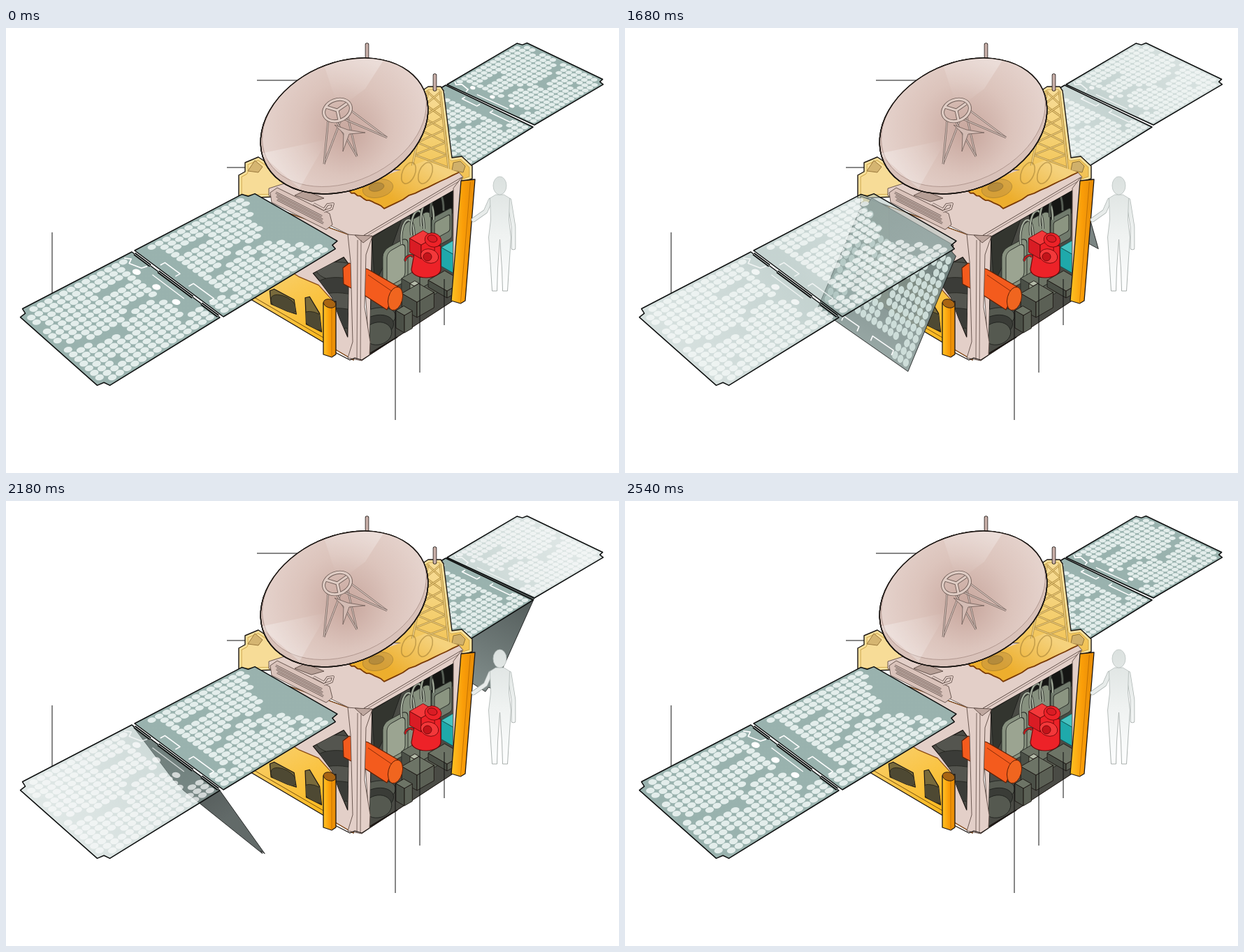
Write an HTML page with a canvas that moves like this. It is 877 px wide and 638 px high and loops after 4040 ms.

```html
<!DOCTYPE html>
<html lang="en">
<head>
<meta charset="utf-8">
<title>Orbiter unfolding its solar panels</title>
<style>
html, body { margin: 0; width: 100%; height: 100%; overflow: hidden; background: #fff; }
canvas { display: block; width: 877px; height: 638px; }
</style>
</head>
<body>
<canvas id="stage"></canvas>
<script>
const W = 877, H = 638, LOOP = 4040, STEP = 60;
const canvas = document.getElementById('stage');
const g = canvas.getContext('2d');
const dpr = window.devicePixelRatio || 1;
canvas.width = Math.round(W * dpr);
canvas.height = Math.round(H * dpr);

const INK = '#1c1714', PINK = '#e3cfc8', EDGE = '#5d4b45', FOIL = '#f7dc97';

// ---- drawing helpers ----
function path(p, open) {
  g.beginPath();
  for (let i = 0; i < p.length; i += 2) g.lineTo(p[i], p[i + 1]);
  if (!open) g.closePath();
}
function paint(fill, stroke, width = 0.9) {
  if (fill) { g.fillStyle = fill; g.fill(); }
  if (stroke) { g.strokeStyle = stroke; g.lineWidth = width; g.stroke(); }
}
function poly(p, fill, stroke, width) { path(p); paint(fill, stroke, width); }
function line(p, stroke, width) { path(p, true); paint(null, stroke, width); }
function rod(p, color, width, edge = EDGE) {
  line(p, edge, width + 1.6);
  line(p, color, width);
}
function oval(x, y, rx, ry, turn, fill, stroke, width) {
  g.beginPath();
  g.ellipse(x, y, rx, ry, turn, 0, Math.PI * 2);
  paint(fill, stroke, width);
}
function fade(x0, y0, x1, y1, ...colors) {
  const f = g.createLinearGradient(x0, y0, x1, y1);
  colors.forEach((c, i) => f.addColorStop(i / (colors.length - 1), c));
  return f;
}
function scoped(draw) { g.save(); draw(); g.restore(); }
function hash(i, j) {
  const s = Math.sin(i * 127.1 + j * 311.7) * 43758.5453;
  return s - Math.floor(s);
}

// A quad holds a0, a1, b1, b0; u runs from edge a to edge b, v from 0 to 1.
function place(q, u, v) {
  return [0, 1].map(i =>
    (q[i] * (1 - v) + q[2 + i] * v) * (1 - u) + (q[6 + i] * (1 - v) + q[4 + i] * v) * u);
}
// Polygon on an upright face: pairs of (right, down) fractions.
function patch(q, p, fill, stroke, width) {
  const out = [];
  for (let i = 0; i < p.length; i += 2) out.push(...place(q, p[i + 1], p[i]));
  poly(out, fill, stroke, width);
}
// Box seen from its front edge; x, y is the top of that edge.
function box(x, y, left, right, h, [top, side, front], edge = INK) {
  const lx = x - left * 0.87, ly = y - left * 0.5, rx = x + right * 0.87, ry = y - right * 0.5;
  poly([x, y, lx, ly, lx, ly + h, x, y + h], side, edge);
  poly([x, y, rx, ry, rx, ry + h, x, y + h], front, edge);
  poly([x, y, lx, ly, lx + rx - x, ly + ry - y, rx, ry], top, edge);
}
// Rounded plate parallel to the right-hand face.
function plate(x, y, w, h, r, fill) {
  scoped(() => {
    g.transform(1, -0.55, 0, 1, x, y);
    g.beginPath();
    g.roundRect(0, 0, w, h, r);
    paint(fill, '#2b2e29', 1);
  });
}
function arch(x, y, w, h, color) {
  for (const [c, lw] of [['#30332e', 3.8], [color, 2.2]]) {
    g.beginPath();
    g.moveTo(x, y);
    g.bezierCurveTo(x - 4, y - h, x + w, y - h - w * 0.9, x + w, y - w * 0.5);
    paint(null, c, lw);
  }
}

// ---- solar panels: hinge edge first, free edge last ----
const PANELS = {
  nearIn: [184, 319, 311, 414, 482, 310, 348, 233],
  nearOut: [180, 321, 306, 415, 138, 519, 13, 408],
  farIn: [629, 82, 754, 142, 640, 213, 520, 145],
  farOut: [631, 81, 756, 139, 861, 77, 738, 18]
};
function outline(q) {
  const notched = [[0, 0], [0, 1], [0.937, 1], [0.95, 0.95], [1, 0.94], [1, 0.06], [0.95, 0.05], [0.937, 0]];
  return notched.flatMap(([u, v]) => place(q, u, v));
}
function hasCell(u, v, inner) {
  if (u < 0.14 && v > 0.06 && v < 0.82) return false;
  if (inner && u > 0.95 - 0.2 * Math.sin(Math.PI * v)) return false;
  if (u > 0.93 && (v < 0.07 || v > 0.93)) return false;
  const wave = Math.sin(u * 9 + (inner ? 0 : 2));
  return Math.abs(v - 0.55 - 0.07 * wave) > 0.028 && !(u < 0.5 && Math.abs(v - 0.3 + 0.2 * u) < 0.025);
}
function cells(q, inner, color) {
  const nu = 15, nv = 16;
  g.fillStyle = color;
  for (let i = 0; i < nu; i++) for (let j = 0; j < nv; j++) {
    const u = 0.015 + (i + 0.5) / nu * 0.96, v = 0.02 + (j + 0.5) / nv * 0.96;
    if (!hasCell(u, v, inner) || hash(i, j) < 0.02) continue;
    const [x, y] = place(q, u, v), a = place(q, u + 0.96 / nu, v), b = place(q, u, v + 0.96 / nv);
    scoped(() => {
      g.transform(a[0] - x, a[1] - y, b[0] - x, b[1] - y, x, y);
      g.beginPath();
      g.arc(0, 0, 0.47, 0, 7);
    });
    g.fill();
  }
}
function fittings(q, inner) {
  const at = (u, v) => place(q, u, v);
  if (inner) {
    for (const [a, b] of [[0.25, 0.42], [0.57, 0.8]])
      line([at(0.03, a), at(0.07, a), at(0.07, b), at(0.03, b)].flat(), '#fff', 1.6);
    return;
  }
  line([at(0.08, 0.02), at(0.05, 0.06), at(0.09, 0.09), at(0.06, 0.19), at(0.02, 0.2)].flat(), '#fff', 1.7);
  line([at(0.05, 0.3), at(0.05, 0.66)].flat(), '#fff', 1.4);
  const size = Math.hypot(q[4] - q[2], q[5] - q[3]) / 195;
  for (let i = 0; i < 3; i++) oval(...at(0.11, 0.2 + i * 0.225), 6 * size, 4 * size, 0.2, '#fff');
}
function panel(q, inner, { alpha = 1, light = [65, 65 + (1 - alpha) * 25], sat = 14, cell, edge = 1.5 }) {
  const root = place(q, 0, 0.5), tip = place(q, 1, 0.5), shape = outline(q);
  scoped(() => {
    g.globalAlpha = alpha;
    poly(shape, fade(...root, ...tip, ...light.map(l => `hsl(170 ${sat}% ${l}%)`)));
    g.globalAlpha = 0.4 + 0.6 * alpha;
    if (cell !== 0) {
      cells(q, inner, `hsl(168 21% ${cell || 91 + (1 - alpha) * 14}%)`);
      fittings(q, inner);
    }
  });
  poly(shape, null, '#0d0f0f', edge);
}
function slots(q) {
  for (const [a, b] of [[0.03, 0.21], [0.3, 0.69], [0.79, 0.98]]) {
    const p = [...place(q, 0, a), ...place(q, 0, b)];
    line(p, '#0d0f0f', 4.5);
    line(p, '#dbe4e2', 1);
  }
}

// Swing about a hinge: angle 0 hangs down, 90 is fully open.
function swing(hinge, open, down, angle) {
  const r = angle * Math.PI / 180, c = Math.cos(r), s = Math.sin(r);
  const tip = i => hinge[i] + (open[i] - hinge[i]) * s + down[i] * c;
  return [...hinge, tip(2), tip(3), tip(0), tip(1)];
}
function hangInner(hinge, home, down, angle) {
  const q = swing(hinge, home.slice(0, 4), down, angle);
  return [...q.slice(6), ...q.slice(4, 6), ...q.slice(2, 4), ...q.slice(0, 2)];
}
function hangOuter(home, down, angle) {
  return swing(home.slice(0, 4), [...home.slice(6), ...home.slice(4, 6)], down, angle);
}
function swingFar({ first, second }) {
  if (first !== undefined)
    panel(hangInner([545, 150, 645, 202], PANELS.farIn, [-20, 155, -20, 160], first), true,
      { light: [50, 32], sat: 4, cell: 0, edge: 0.8 });
  if (second !== undefined) {
    const lift = 26 * Math.max(0, Math.sin(second * Math.PI / 180));
    panel(hangOuter(PANELS.farOut, [-5, 98, -5, 126], second), false,
      { light: [34 + lift, 52 + lift], sat: 5, cell: 0, edge: 0.8 });
  }
}
function swingNear({ first, second, solid }) {
  if (first !== undefined)
    panel(hangInner([345, 239, 478, 316], PANELS.nearIn, [5, 142, 4, 148], first), true,
      { alpha: solid, light: [60, 43], sat: 8, cell: 84, edge: 0.8 });
  if (second !== undefined)
    panel(hangOuter(PANELS.nearOut, [-32, 164, -30, 186], second), false,
      second < -25 ? { light: [30, 40], sat: 4, cell: 0, edge: 0.8 } : { light: [46, 60], sat: 8, cell: 86, edge: 0.8 });
}

// ---- spacecraft ----
function foil(p, fill) {
  scoped(() => {
    path(p);
    g.clip();
    paint(fill, '#c99f3d', 9);
    paint(null, '#f8e09c', 7.4);
  });
  poly(p, null, INK, 1.4);
}
function backWalls() {
  foil([333, 244, 333, 211, 342, 206, 342, 193, 361, 185, 376, 195, 440, 240], FOIL);
  poly([346, 205, 356, 190, 367, 199, 361, 207], '#d5b571', '#927035');
  foil([598, 88, 604, 84, 622, 84, 626, 90, 638, 186, 652, 184, 667, 198, 667, 216, 541, 258, 540, 200],
    fade(600, 90, 590, 250, FOIL, '#f4cd6b', '#f0b83d'));
  poly([638, 204, 640, 193, 650, 191, 657, 198, 654, 207], '#d0b06a', '#8c6d33');
  const left = y => 604 - (y - 90) * 0.21, right = y => 621 + (y - 90) * 0.11;
  for (let y = 92; y < 200; y += 18) {
    rod([left(y), y, right(y + 18), y + 18], '#f0d287', 1.2, '#b08c3c');
    rod([right(y), y, left(y + 18), y + 18], '#f0d287', 1.2, '#b08c3c');
  }
  for (const side of [left, right]) rod([side(90), 90, side(208), 208], '#f0d287', 1.4, '#b08c3c');
  g.lineCap = 'round';
  for (const [x, y] of [[613.5, 68], [516.5, 24]]) rod([x, y, x, y + 20], '#c9b0a9', 4, INK);
  g.lineCap = 'butt';
}

// Ragged line through key points.
function jag(p) {
  const out = [];
  for (let i = 0; i + 3 < p.length; i += 2) for (let k = 0; k < 12; k++) {
    const t = k / 12;
    out.push(p[i] + (p[i + 2] - p[i]) * t, p[i + 1] + (p[i + 3] - p[i + 1]) * t + (hash(i, k) - 0.5) * 3);
  }
  return [...out, ...p.slice(-2)];
}
function topFace() {
  poly([376, 230, 470, 200, 648, 207, 654, 214, 509, 299, 492, 297, 376, 240], PINK, EDGE);
  const torn = jag([490, 234, 541, 258, 648, 207]);
  poly([...torn, 600, 190, 520, 220], fade(600, 190, 560, 250, '#f5d27d', '#edae2d'));
  line(torn, '#7a3b08', 1.8);
  scoped(() => {
    g.globalAlpha = 0.45;
    oval(532, 230, 22, 13, -0.2, '#b58d45', '#7d6029');
    oval(530, 228, 11, 6, -0.2, '#8f7440', '#71551f');
    for (const x of [576, 600]) oval(x, 208, 9, 16, 0.4, null, '#8c6a27', 1.6);
  });
  poly([378, 236, 388, 229, 463, 266, 467, 282, 458, 289, 380, 250], '#dac3bb', EDGE);
  for (let i = 0; i < 3; i++) rod([386 + i, 236 + i * 5, 452 + i, 270 + i * 5], PINK, 1.3);
  poly([413, 240, 428, 233, 455, 244, 437, 249], '#b69f96', EDGE);
  rod([440, 252, 455, 260, 460, 253, 468, 252, 466, 259, 455, 263], PINK, 2);
}

const LEFT = [337, 241, 500, 300, 497, 476, 340, 383];
function leftFace() {
  patch(LEFT, [0, 0, 1, 0, 1, 1, 0, 1], fade(350, 290, 440, 450, FOIL, '#fbb91f'), INK, 1.4);
  line([...place(LEFT, 0.96, 0.02), ...place(LEFT, 0.96, 0.74)], '#7a5510', 1);
  patch(LEFT, [0.25, 0, 1, 0, 1, 1, 0.8, 1, 0.8, 0.6, 0.68, 0.53, 0.5, 0.54, 0.25, 0.5], PINK, '#8a4a14', 1.2);
  scoped(() => {
    patch(LEFT, [0.63, 0.45, 0.9, 0.2, 0.945, 0.24, 0.945, 0.84, 0.87, 0.72, 0.8, 0.58, 0.7, 0.5], '#4b4c46', INK, 1.2);
    g.clip();
    for (let i = 0; i < 4; i++) oval(480, 350 + i * 22, 36, 14, 0.1, i % 2 ? '#3b3c38' : '#54554f', '#252621');
  });
  const windows = [[0.24, 0.81, 0.28, 0.77, 0.46, 0.77, 0.48, 0.89, 0.4, 0.91, 0.25, 0.93],
    [0.56, 0.7, 0.6, 0.67, 0.69, 0.77, 0.71, 0.92, 0.57, 0.93]];
  windows.forEach((w, i) => scoped(() => {
    patch(LEFT, w, '#786a3c', INK, 1.2);
    g.clip();
    oval(397 + i * 46, 396 + i * 24, 20, 11, 0.5, '#4e4933', '#292417');
  }));
}

const RIGHT = [509, 299, 652, 214, 641, 390, 520, 469];
const METAL = ['#6d7466', '#4b5047', '#5b6055'];
function instruments() {
  patch(RIGHT, [0, 0, 1, 0, 1, 1, 0, 1], PINK, EDGE);
  line([...place(RIGHT, 0.02, 0.02), ...place(RIGHT, 0.02, 1)], EDGE, 0.7);
  scoped(() => {
    patch(RIGHT, [0.1, 0.05, 0.92, 0.07, 0.99, 1, 0, 1], '#4a4b45', INK, 1);
    g.clip();
    patch(RIGHT, [0.48, 0.05, 0.93, 0.05, 0.93, 0.26, 0.5, 0.26], '#151614');
    patch(RIGHT, [0.1, 0.06, 0.4, 0.05, 0.25, 0.3, 0.1, 0.45], '#33352f', '#1e1f1c');
    plate(566, 283, 42, 92, 10, '#87917f');
    plate(539, 319, 36, 62, 9, '#87917f');
    plate(545, 322, 26, 50, 7, '#9ba491');
    plate(609, 273, 29, 44, 4, '#717b6d');
    plate(613, 279, 22, 24, 3, '#8b9581');
    for (let i = 0; i < 4; i++) arch(566 + i * 14, 310 - i * 13, 18, 36, i < 3 ? '#a4ad9c' : '#5b6359');
    for (let i = 0; i < 3; i++) oval(528 + i * 2, 418 + i * 10, 30 - i * 5, 16, -0.25, i % 2 ? '#3a3c37' : '#555950', '#1f211d');
    box(592, 374, 30, 34, 20, METAL, '#282b26');
    box(584, 370, 7, 8, 10, ['#b3baa8', '#8d9684', '#9ba491']);
  });
  box(588, 393, 25, 28, 22, METAL);
  box(631, 377, 31, 27, 10, METAL);
  box(570, 412, 14, 13, 25, METAL);
}
function frame() {
  patch(RIGHT, [0.92, 0.05, 1, 0, 1, 0.9, 0.98, 0.92], PINK, EDGE);
  line([520, 467, 560, 443], INK, 2);
  poly([489, 296, 524, 299, 515, 325, 513, 400, 521, 450, 520, 469, 509, 477, 489, 473, 496, 450, 493, 335], PINK, EDGE);
  poly([499, 297, 524, 298, 511, 308], '#bea79f', EDGE);
  for (const x of [503, 508]) line([x, 304, x - 1, 475], EDGE, 0.8);
  line([467, 463, 492, 476, 499, 473, 509, 476, 520, 469], INK, 1.3);
}

function pillar(x0, y0, x1, y1, w) {
  poly([x0 - w, y0, x0 + w, y0 - 2, x1 + w, y1, x1 + w / 3, y1 + 4, x1 - w, y1],
    fade(x1 - w, y1, x0 + w, y1, '#ffc325', '#fa9d08', '#e58a06'), INK, 1.3);
  line([x0 + w / 3, y0 + 2, x1 + w / 3, y1 + 4], '#b76905', 0.8);
}

const RED = ['#f3383a', '#d91c24', '#ed2228'];
const TEAL = ['#45c2c0', '#1fa9ab', '#25b3b4'];
function cameras() {
  box(641, 325, 21, 19, 27, TEAL, '#0d5758');
  oval(650, 331, 7, 10, 0.2, '#17a1a3', '#0d5758');

  const dark = '#6f0709';
  g.beginPath();
  g.ellipse(601, 346, 21, 12, 0, 0, Math.PI);
  g.lineTo(585, 318);
  g.lineTo(622, 312);
  g.closePath();
  paint(RED[2], dark, 1.2);
  box(594, 311, 19, 22, 20, RED, dark);
  oval(611, 304, 12, 10, 0.3, RED[2], dark);
  oval(610, 302, 7, 5, 0.3, RED[1], dark);
  oval(606, 327, 13, 10, 0.3, RED[0], dark);
  oval(603, 328, 6, 6, 0, '#c4141a', dark);
  arch(572, 334, 10, 4, '#c2191d');

  poly([482, 344, 491, 337, 518, 346, 561, 371, 545, 404, 514, 384, 483, 367], '#f45b1d', '#5d1e05', 1.1);
  line([518, 354, 553, 378], '#7d2807', 0.9);
  oval(557, 388, 10, 17, 0.25, '#f0651f', '#5d1e05', 1);
}

function dish() {
  const rim = fill => oval(484, 140.5, 125, 90.7, -0.426, fill, INK, 1.4);
  rim('#d9c2ba');
  scoped(() => {
    rim();
    g.clip();
    const bowl = g.createRadialGradient(488, 150, 10, 484, 138, 125);
    bowl.addColorStop(0, '#caaaa1');
    bowl.addColorStop(0.5, '#dcc4bc');
    bowl.addColorStop(1, '#e6d4ce');
    oval(484, 134, 123, 86, -0.43, bowl, '#a68c84', 0.8);
    g.globalAlpha = 0.3;
    poly([454, 50, 544, 40, 514, 87, 490, 105, 472, 105], fade(510, 45, 485, 110, '#fff', '#fff0'));
    poly([460, 160, 420, 230, 364, 180], fade(460, 160, 390, 205, '#fff0', '#fff'));
  });
  rim();

  const metal = '#dfccc4';
  for (const [x, y] of [[455, 195], [502, 184], [545, 157]]) {
    const a = Math.atan2(y - 118, x - 474);
    for (const side of [-0.5, 0.5])
      rod([474 + 19 * Math.cos(a + side), 118 + 15 * Math.sin(a + side), x, y], metal, 1.1, '#75635d');
  }
  poly([470, 139, 489, 146, 514, 150, 491, 152, 482, 177, 483, 151], '#d4bcb4', '#75635d');
  for (const [color, lw] of [['#6f5d57', 5], [metal, 3.2]]) {
    oval(474, 118, 20, 15, -0.38, null, color, lw);
    for (let i = 0; i < 3; i++) {
      const a = i * Math.PI * 2 / 3 - 0.7;
      line([474, 118, 474 + 18 * Math.cos(a), 118 + 15 * Math.sin(a)], color, lw);
    }
  }
}

function person() {
  const skin = fade(0, 213, 0, 378, '#dbe1df', '#eff2f1', '#fdfefe');
  const rim = fade(0, 213, 0, 378, '#bcc4c2', '#919996');
  const half = [6, 239, 14, 244, 13, 275, 16, 300, 13, 345, 11, 377, 4, 377, 3, 345, 0, 303];
  const body = [];
  for (let i = 0; i < half.length; i += 2) {
    body.push(706.5 + half[i], half[i + 1]);
    if (half[i]) body.unshift(706.5 - half[i], half[i + 1]);
  }
  const front = body.slice(0, -2), n = half.length - 2;
  g.lineCap = 'round';
  rod([693, 247, 686, 263, 669, 275], skin, 5, rim);
  rod([720, 247, 726, 285, 726, 315], skin, 5, rim);
  g.lineCap = 'butt';
  poly([...front.slice(0, n), ...front.slice(n), 706.5, 303], skin, rim, 0.8);
  oval(706.5, 226, 9.5, 13, 0, skin, rim, 0.8);
}

function callouts() {
  line([359, 75, 416, 75], '#111', 1);
  line([316, 200, 342, 200], '#111', 1);
  for (const [x, y0, y1] of [[66, 293, 381], [557, 405, 562], [592, 357, 494], [627, 360, 426]])
    line([x, y0, x, y1], '#111', 1);
}

// ---- timing ----
function poseAt(t) {
  if (t < 1500 || t >= 2540) return { inner: 1, outer: 1 };
  if (t < 1860) {
    const k = Math.floor((t - 1500) / STEP), a = Math.max(0.55, 0.78 - k * 0.07);
    return { inner: a, outer: a, first: 90 * Math.pow(k / 6, 1.72), solid: Math.min(0.95, 0.4 + k * 0.19) };
  }
  if (t < 2060) return { inner: 1, outer: 0.55 };
  const k = Math.floor((t - 2060) / STEP);
  return { inner: 1, outer: 0.55 - k * 0.03, second: -80 + 170 * Math.pow(k / 8, 0.94) };
}

function draw(pose) {
  g.setTransform(canvas.width / W, 0, 0, canvas.height / H, 0, 0);
  g.fillStyle = '#fff';
  g.fillRect(0, 0, W, H);
  g.lineJoin = 'round';
  swingFar(pose);
  panel(PANELS.farIn, true, { alpha: pose.inner });
  panel(PANELS.farOut, false, { alpha: pose.outer });
  backWalls();
  leftFace();
  topFace();
  instruments();
  cameras();
  frame();
  pillar(661, 219, 647, 391, 10);
  pillar(463, 394, 463, 468, 9);
  oval(463, 395, 9, 6, 0.3, '#a86412', INK);
  dish();
  person();
  swingNear(pose);
  panel(PANELS.nearIn, true, { alpha: pose.inner });
  panel(PANELS.nearOut, false, { alpha: pose.outer });
  slots(PANELS.nearOut);
  callouts();
}

const start = performance.now();
let shown = '';
function tick() {
  const pose = poseAt((performance.now() - start) % LOOP);
  const key = JSON.stringify(pose);
  if (key !== shown) {
    draw(pose);
    shown = key;
  }
  requestAnimationFrame(tick);
}
tick();
</script>
</body>
</html>
```
